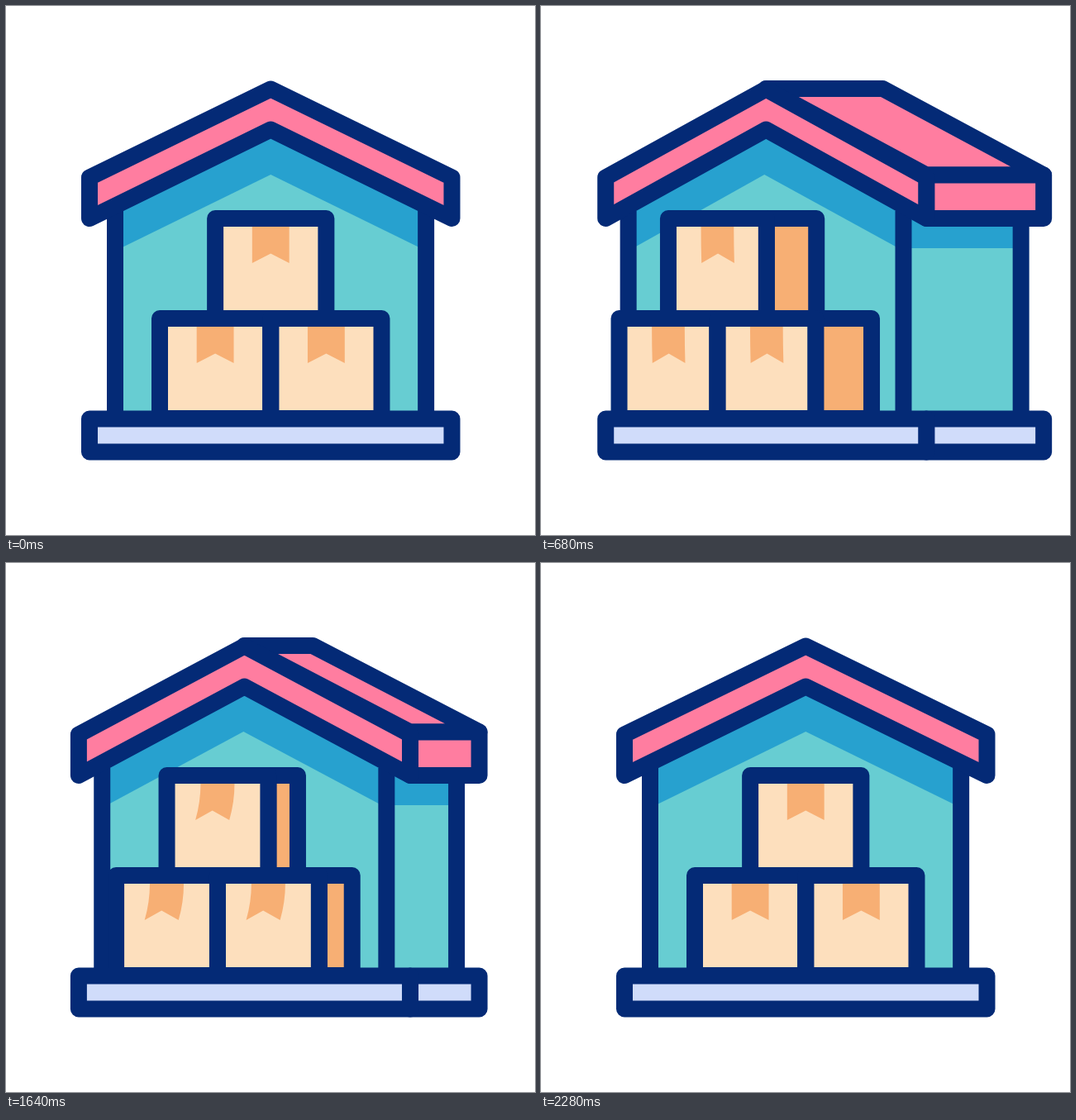
Animation, 640 px wide and 640 px high, one loop 2440 ms. Source, as an HTML page with a canvas:

```html
<!DOCTYPE html>
<html lang="en">
<head>
<meta charset="utf-8">
<title>Warehouse</title>
<style>
  html, body { margin: 0; width: 100%; height: 100%; overflow: hidden; background: #fff; }
  canvas { display: block; width: 640px; height: 640px; }
</style>
</head>
<body>
<canvas id="stage" width="640" height="640"></canvas>
<script>
const ctx = document.getElementById('stage').getContext('2d');
const LOOP = 2440, RETURN_AT = 1400, TURN = 800, RIBBON_LAG = 20;
const NAVY = '#042a76', PINK = '#ff7da0', TEAL = '#67cdd2', BLUE = '#27a1cf',
      CREAM = '#fddfbd', ORANGE = '#f7af74', LAVENDER = '#d0dcfa';
const GROUND = 499, SHELF = 378, TOP = 257;

const mix = (a, b, k) => a + (b - a) * k;

// Cubic Bezier easing with handles (a, 0) and (b, 1).
function ease(a, b) {
  return x => {
    if (x <= 0) return 0;
    if (x >= 1) return 1;
    let lo = 0, hi = 1;
    for (let i = 0; i < 30; i++) {
      const s = (lo + hi) / 2, r = 1 - s;
      if (3 * r * r * s * a + 3 * r * s * s * b + s * s * s < x) lo = s; else hi = s;
    }
    return lo * lo * (3 - 2 * lo);
  };
}

const turnOut = { slide: ease(.58, .05), squeeze: ease(.38, .55), depth: ease(.48, .31) };
const turnBack = { slide: ease(.33, .22), squeeze: ease(.26, .58), depth: ease(.33, .23) };

function pose(t) {
  const back = t >= RETURN_AT;
  const curves = back ? turnBack : turnOut;
  const x = (back ? t - RETURN_AT : t) / TURN;
  const at = name => back ? 1 - curves[name](x) : curves[name](x);
  const slide = at('slide'), squeeze = at('squeeze'), depth = at('depth');
  const left = 101 - 23 * slide;
  const front = 438.5 - 52.5 * squeeze;
  const split = left + front;
  const apex = left + front / 2;
  return {
    depth, left, split, apex,
    right: split + 144.5 * depth,
    ridge: apex + 143.5 * mix(depth, slide, .28),
    wallLeft: left + .0707 * front,
    wallSplit: split - .0715 * front,
    boxLeft: 186 - 92.5 * mix(slide, depth, .2),
    boxWidth: 134.25 - 16 * squeeze
  };
}

function shape(points, fill, outlined) {
  ctx.beginPath();
  points.forEach(([x, y]) => ctx.lineTo(x, y));
  ctx.closePath();
  ctx.fillStyle = fill;
  ctx.fill();
  if (outlined) ctx.stroke();
}

function box(x0, y0, x1, y1, fill, outlined) {
  shape([[x0, y0], [x1, y0], [x1, y1], [x0, y1]], fill, outlined);
}

function post(x, y) {
  ctx.beginPath();
  ctx.moveTo(x, y);
  ctx.lineTo(x, GROUND);
  ctx.stroke();
}

// The tail of the ribbon trails behind its box.
function ribbon(x, y, width, drift) {
  const half = width * .167, end = y + 54;
  ctx.beginPath();
  ctx.moveTo(x - half, y);
  ctx.lineTo(x - half, y + 10);
  ctx.quadraticCurveTo(x - half, y + 32, x - half + drift, end);
  ctx.lineTo(x + drift, end - 11.5);
  ctx.lineTo(x + half + drift, end);
  ctx.quadraticCurveTo(x + half, y + 32, x + half, y + 10);
  ctx.lineTo(x + half, y);
  ctx.fillStyle = ORANGE;
  ctx.fill();
}

function crates(x, y, bottom, count, width, depth, drift) {
  const end = x + count * width;
  if (depth > .3) box(end, y, end + depth, bottom, ORANGE, true);
  for (let i = 0; i < count; i++) {
    const start = x + i * width;
    box(start, y, start + width, bottom, CREAM);
    ribbon(start + width / 2, y, width, drift);
  }
  for (let i = 0; i < count; i++) {
    ctx.strokeRect(x + i * width, y, width, bottom - y);
  }
}

function walls(p) {
  const wallRight = p.right - 31.5 + 4 * Math.min(1, p.depth * 4);
  const turned = p.depth > .003;
  if (turned) {
    box(p.wallSplit, TOP, wallRight, GROUND, TEAL);
    box(p.wallSplit, TOP, wallRight, 293, BLUE);
  }
  ctx.save();
  ctx.beginPath();
  ctx.rect(p.wallLeft, 140, p.wallSplit - p.wallLeft, GROUND - 140);
  ctx.clip();
  const gable = (y, x, fill) =>
    shape([[p.left, y + 107.5], [x, y], [p.split, y + 107.5], [p.split, GROUND], [p.left, GROUND]], fill);
  gable(149.5, p.apex, BLUE);
  gable(204, p.apex - 2 * p.depth, TEAL);
  ctx.restore();
  post(p.wallLeft, 248);
  post(p.wallSplit, 248);
  if (turned) post(wallRight, TOP);
}

function roof(p) {
  if (p.depth > .003) {
    shape([[p.apex, 100], [p.ridge, 100], [p.right, 204.5], [p.split, 204.5]], PINK, true);
    box(p.split, 204.5, p.right, TOP, PINK, true);
  }
  shape([[p.left, 207.5], [p.apex, 100.5], [p.split, 207.5],
         [p.split, TOP], [p.apex, 149.5], [p.left, TOP]], PINK, true);
}

function draw(t) {
  const p = pose(t), before = pose(Math.max(0, t - RIBBON_LAG));
  const middle = q => q.boxLeft + q.boxWidth;
  const drift = middle(before) - middle(p);
  ctx.fillStyle = '#fff';
  ctx.fillRect(0, 0, 640, 640);
  ctx.strokeStyle = NAVY;
  ctx.lineWidth = 20;
  ctx.lineJoin = 'round';

  walls(p);
  roof(p);
  crates(p.boxLeft + p.boxWidth / 2, TOP, SHELF, 1, p.boxWidth, 61.5 * p.depth, drift);
  crates(p.boxLeft, SHELF, GROUND, 2, p.boxWidth, 69 * p.depth, drift);
  if (p.depth > .003) box(p.split, GROUND + .5, p.right, 539.5, LAVENDER, true);
  box(p.left, GROUND + .5, p.split, 539.5, LAVENDER, true);
}

const begin = performance.now();
function tick() {
  draw((performance.now() - begin) % LOOP);
  requestAnimationFrame(tick);
}
tick();
</script>
</body>
</html>
```
